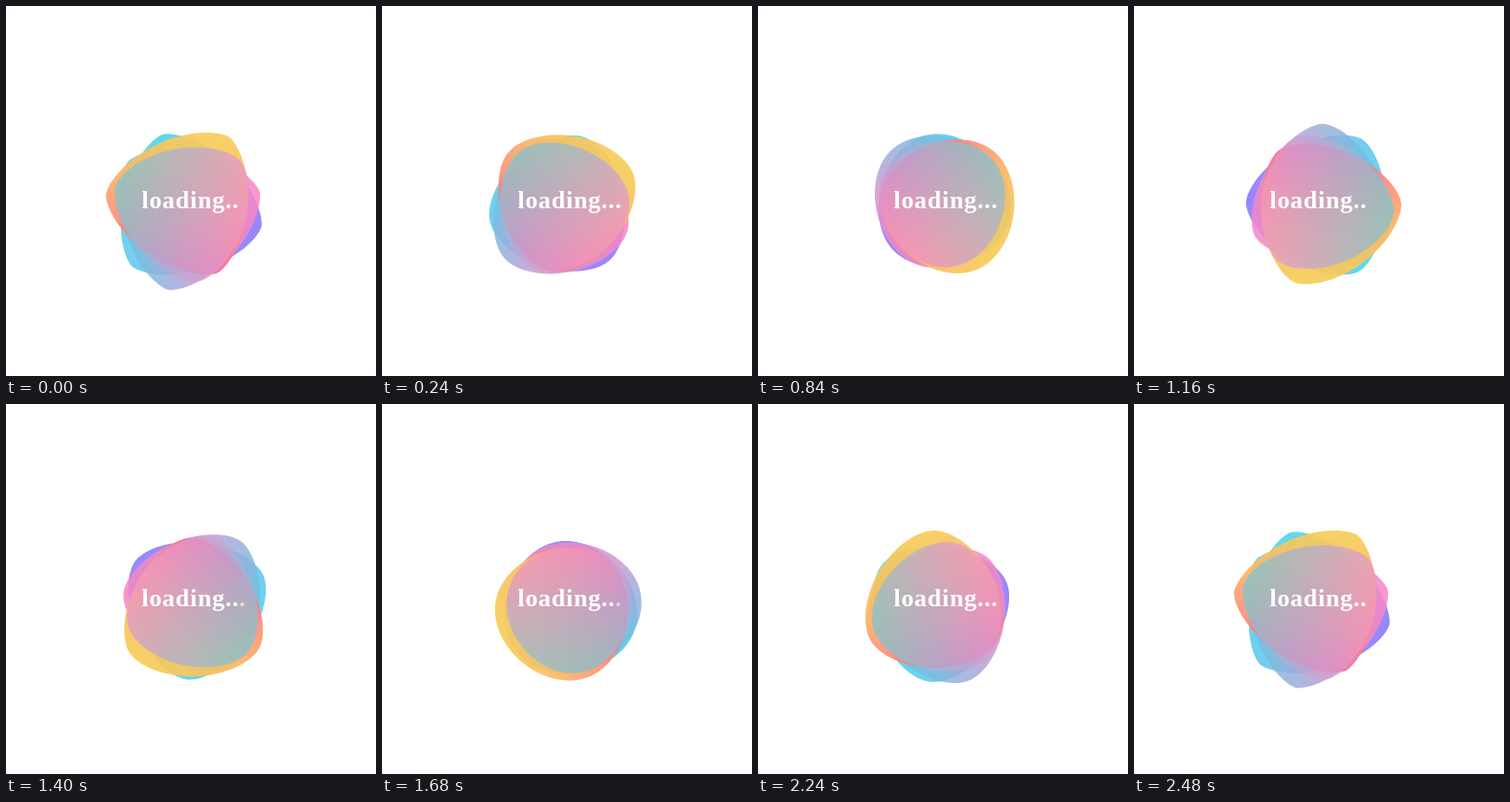
An HTML page with a canvas that plays this animation: 386x386 px, repeating every 2.52 s.

```html
<!DOCTYPE html>
<html lang="en">
<head>
<meta charset="utf-8">
<title>Loading</title>
<style>
  html, body { margin: 0; width: 100%; height: 100%; overflow: hidden; background: #fff; }
  canvas { display: block; width: 386px; height: 386px; }
</style>
</head>
<body>
<canvas id="stage" width="386" height="386"></canvas>
<script>
const ctx = document.getElementById('stage').getContext('2d');
const SIZE = 386, LOOP = 2520, STEP = 40, TURN = 2480, DOT_CYCLE = 620;
const PIVOT = { x: 192, y: 210 }, GROWTH = 6.5;
const TAU = Math.PI * 2;
const rad = deg => deg * Math.PI / 180;
const clamp = v => Math.min(1, Math.max(0, v));

// Circles that swell into rounded triangles: centre, radius, corner size,
// corner angle, gradient angle and colours. Listed from back to front.
const blobs = [
  { x: -5, y: 2, radius: 67, corner: 8, tip: 13, slope: 28, alpha: 0.92,
    colors: ['#4cd8e6', '#72c4f2', '#8f7bfb'] },
  { x: -5, y: 7, radius: 66.5, corner: 8, tip: 103, slope: 5, alpha: 0.85,
    colors: ['#5ccbe4', '#a6a8d8', '#ff82c4'] },
  { x: -6, y: -6, radius: 67.5, corner: 8, tip: 65, slope: 100, alpha: 0.93,
    colors: ['#f6cf5a', '#fabb64', '#fd927a', '#ee62ac'] },
  { x: -5, y: 2, radius: 63.5, corner: 6.5, tip: 79, slope: 12, alpha: 0.75,
    colors: ['#7cc6d0', '#bca8d2', '#fa8fc6'] }
];

// Outline from its distance to the tangent at each angle, so it stays convex.
function paintBlob(blob, swell) {
  const radius = blob.radius + GROWTH * swell, corner = blob.corner * swell;
  ctx.save();
  ctx.translate(blob.x, blob.y);
  ctx.beginPath();
  for (let i = 0; i < 180; i++) {
    const a = i / 180 * TAU, wave = 3 * (a - rad(blob.tip));
    const reach = radius + corner * Math.cos(wave);
    const slide = -3 * corner * Math.sin(wave);
    ctx.lineTo(reach * Math.cos(a) - slide * Math.sin(a),
               reach * Math.sin(a) + slide * Math.cos(a));
  }
  ctx.closePath();
  const gx = 76 * Math.cos(rad(blob.slope)), gy = 76 * Math.sin(rad(blob.slope));
  const fill = ctx.createLinearGradient(-gx, -gy, gx, gy);
  blob.colors.forEach((c, i, all) => fill.addColorStop(i / (all.length - 1), c));
  ctx.globalAlpha = blob.alpha;
  ctx.fillStyle = fill;
  ctx.fill();
  ctx.restore();
}

function paintText(time) {
  ctx.font = 'bold 26px "Liberation Serif", serif';
  ctx.letterSpacing = '0.7px';
  ctx.fillStyle = '#fff';
  const label = 'loading..', x = 141.5, y = 210.5;
  ctx.fillText(label, x, y);
  // The last dot fades in and out four times per turn.
  const phase = time % DOT_CYCLE;
  ctx.globalAlpha = clamp(Math.min((phase - 60) / 160, (520 - phase) / 160));
  ctx.fillText('.', x + ctx.measureText(label).width, y);
  ctx.globalAlpha = 1;
}

function draw(now) {
  const time = Math.floor(now % LOOP / STEP) * STEP;
  const turn = time / TURN;
  const swell = Math.abs(1 - (turn * 4) % 2);
  ctx.fillStyle = '#fff';
  ctx.fillRect(0, 0, SIZE, SIZE);
  ctx.save();
  ctx.translate(PIVOT.x, PIVOT.y);
  ctx.rotate(TAU * turn);
  blobs.forEach(blob => paintBlob(blob, swell));
  ctx.restore();
  paintText(time);
}

const start = performance.now();
function tick() {
  draw(performance.now() - start);
  requestAnimationFrame(tick);
}
tick();
</script>
</body>
</html>
```
